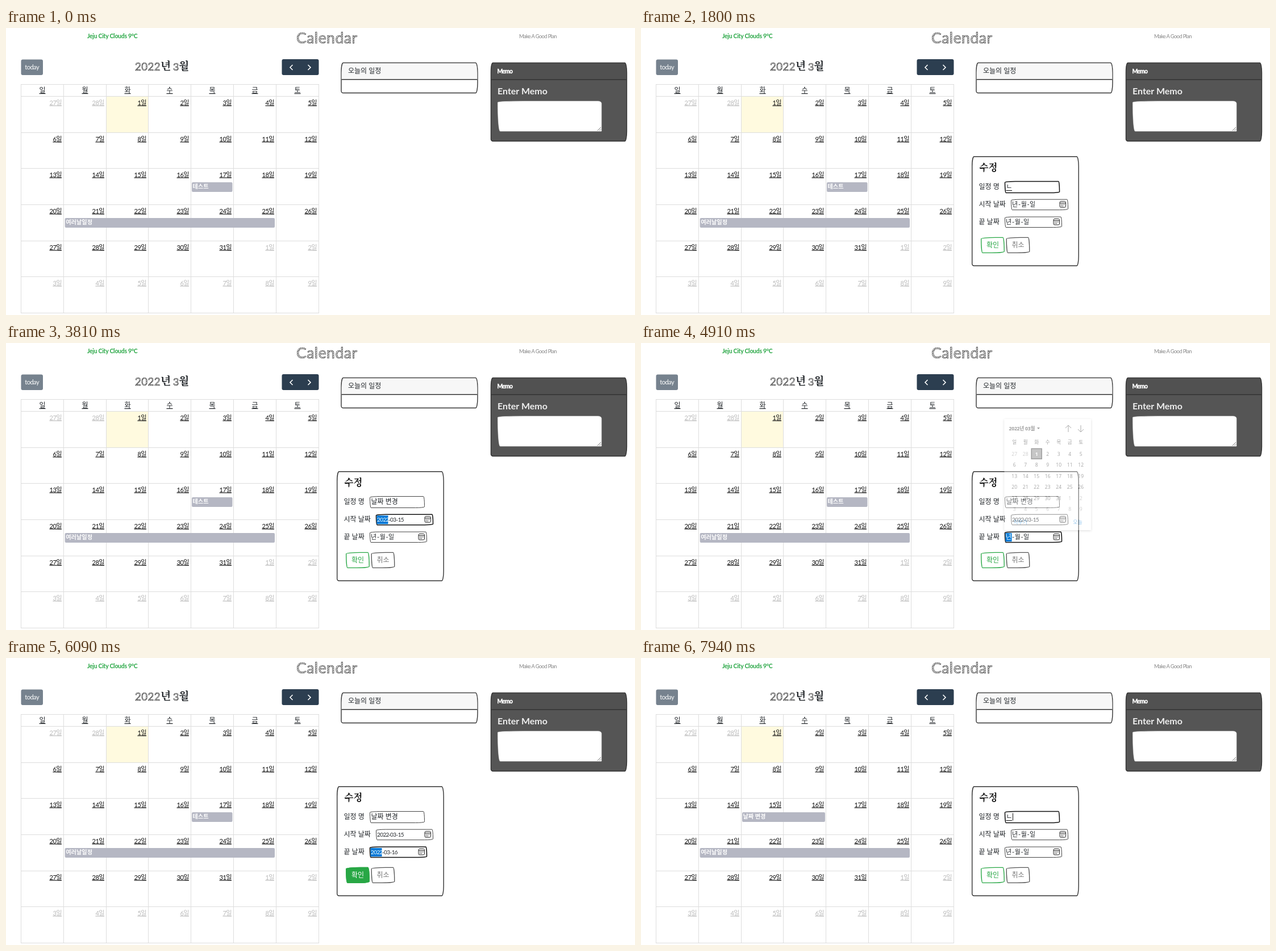
Recreate the animation shown at these times as an HTML page. Size 1107 px wide and 506 px high, loop 8 s.

```html
<!DOCTYPE html>
<html lang="ko">
<head>
<meta charset="utf-8">
<title>Calendar</title>
<style>
  html, body { margin: 0; width: 100%; height: 100%; overflow: hidden; background: #fff; }
  svg { display: block; width: 1107px; height: 506px; }
  text { font-family: Lato, "Noto Sans CJK KR", "Noto Sans CJK", sans-serif; white-space: pre; }
  .sketch { fill: url(#hatch); stroke: #333; stroke-width: .6; letter-spacing: .5px; }
  .tight { letter-spacing: -.6px; }
  .link { text-decoration: underline; }
  .mid { text-anchor: middle; }
  .end { text-anchor: end; }
  .bold { font-weight: 700; }
  .brush { font-family: "Noto Serif CJK KR", "Noto Sans CJK KR", "Noto Sans CJK", serif; font-weight: 600; }
  .pick text { font-family: "Open Sans", "Noto Sans CJK KR", "Noto Sans CJK", sans-serif; }
</style>
</head>
<body>
<svg viewBox="0 0 1107 506">
  <defs>
    <pattern id="hatch" width="2.5" height="2.5" patternUnits="userSpaceOnUse" patternTransform="rotate(40)">
      <rect width="2.5" height="2.5" fill="#fff"/><rect width="1" height="2.5" fill="#666"/>
    </pattern>
    <filter id="shadow" x="-10%" y="-10%" width="120%" height="120%">
      <feDropShadow dx="0" dy="1" stdDeviation="2" flood-opacity=".35"/>
    </filter>
  </defs>
  <g id="base"></g>
  <g id="live"></g>
</svg>
<script>
const WEEK = [...'일월화수목금토'];
const INK = '#212529', BLUE = '#0078d7', GREEN = '#28a745', GREY = '#555';

const text = (x, y, s, size, fill = INK, cls = '', more = '') =>
  `<text x="${x}" y="${y}" font-size="${size}" fill="${fill}" class="${cls}" ${more}>${s}</text>`;
const rect = (x, y, w, h, fill, more = '') =>
  `<rect x="${x}" y="${y}" width="${w}" height="${h}" fill="${fill}" ${more}/>`;
const path = (d, stroke, width = 1, fill = 'none') =>
  `<path d="${d}" fill="${fill}" stroke="${stroke}" stroke-width="${width}"/>`;

// Box with elliptical corners (tl, tr, br, bl), scaled down to fit like CSS border-radius
function boxPath(x, y, w, h, rx, ry) {
  const f = Math.min(1, w / (rx[0] + rx[1]), w / (rx[2] + rx[3]), h / (ry[0] + ry[3]), h / (ry[1] + ry[2]));
  const [a, b, c, d] = rx.map(v => v * f), [e, g, i, j] = ry.map(v => v * f);
  return `M${x + a} ${y}H${x + w - b}a${b} ${g} 0 0 1 ${b} ${g}V${y + h - i}a${c} ${i} 0 0 1 ${-c} ${i}` +
    `H${x + d}a${d} ${j} 0 0 1 ${-d} ${-j}V${y + e}a${a} ${e} 0 0 1 ${a} ${-e}z`;
}
const wobbly = (x, y, w, h) => boxPath(x, y, w, h, [255, 25, 225, 25], [25, 225, 25, 255]);
const card = (x, y, w, h, stroke, fill = '#fff') =>
  path(boxPath(x, y, w, h, [3.5, 3.5, 3.5, 3.5], [17, 17, 17, 3.5]), stroke, 1.4, fill);
const header = (x, y, w, h, stroke, fill) =>
  path(boxPath(x, y, w, h, [3.5, 3.5, 0, 0], [17, 17, 0, 0]), 'none', 0, fill) +
  path(`M${x} ${y + h}h${w}`, stroke, 1.4);

// Day shown in a month grid cell, March 2022 starting on a Tuesday
function dayAt(i) {
  const n = i - 1;
  return n < 1 ? [n + 28, true] : n > 31 ? [n - 31, true] : [n, false];
}

function calendar() {
  const X = i => Math.round(26.1 + 74.8 * i) + .5, Y = j => Math.round(119.9 + 63.7 * j) + .5;
  let s = rect(X(2), Y(0), X(3) - X(2), Y(1) - Y(0), '#fffadf');
  for (let i = 0; i < 8; i++) s += path(`M${X(i)} 99.5V${Y(6)}`, '#ddd');
  for (let j = -1; j < 7; j++) s += path(`M26 ${j < 0 ? 99.5 : Y(j)}H${X(7) + .5}`, '#ddd');
  WEEK.forEach((d, i) => s += text(X(i) + 37.5, 114, d, 12, INK, 'mid link'));
  for (let i = 0; i < 42; i++) {
    const [n, other] = dayAt(i);
    s += text(X(i % 7 + 1) - 3.5, Y(Math.floor(i / 7)) + 15, n + '일', 11.2, other ? '#bbb' : '#111', 'end link tight');
  }
  return s;
}

function base() {
  return text(143, 18, 'Jeju City Clouds 9°C', 10.5, GREEN, 'bold', 'letter-spacing="-.3"') +
    text(511, 27, 'Calendar', 26.5, '', 'sketch') +
    text(903, 18, 'Make A Good Plan', 9.5, '#888', '', 'letter-spacing="-.7"') +
    rect(26.5, 55.5, 38.5, 27.5, '#76828e', 'rx="3"') + text(45.7, 73, 'today', 11, '#fff', 'mid', 'letter-spacing="-.5"') +
    text(227, 75, '2022', 18.6, '', 'sketch') + text(272, 74, '년', 19, INK, 'brush') +
    text(294, 75, '3', 18, '', 'sketch') + text(304, 74, '월', 19, INK, 'brush') +
    rect(485.5, 55, 65, 28, '#2c3e50', 'rx="3"') +
    path('M504.5 65l-4.5 4.5l4.5 4.5M531.5 65l4.5 4.5l-4.5 4.5', '#fff', 1.6) +
    calendar() +
    card(590, 61.5, 240, 53, '#333') + header(590.7, 62.2, 238.6, 28.5, '#333', '#f7f7f7') +
    text(602, 80, '오늘의 일정', 12) +
    card(853.5, 61.5, 239, 138, '#333', GREY) + header(854.2, 62.2, 237.6, 28.8, '#333', '#515151') +
    text(864.5, 79.5, 'Memo', 10.5, '#fff', 'bold', 'letter-spacing="-.9" stroke="#fff" stroke-width=".4"') +
    text(865, 117, 'Enter Memo', 16, '#eee', 'bold') +
    path(boxPath(865.5, 129, 182.5, 53, [45, 6, 0, 4], [2, 4, 0, 48]), '#eee', .6, '#fff') +
    path('M1041 181l6 -6M1044.5 181l2.5 -2.5', '#666', .9);
}

const bar = (x, y, w, s) => rect(x, y, w, 17, '#b5b7c3', 'rx="2"') + text(x + 1.5, y + 11, s, 10.2, '#fff', 'bold');

// Outlined button; p is how far its hover fill has come
function button(x, y, s, color, p = 0, ink = color) {
  const d = wobbly(x + .7, y + .7, 40.5, 27), label = (c, o) => text(x + 21, y + 18, s, 12, c, 'mid', `opacity="${o}"`);
  return path(d, color, 1.3, '#fff') + `<g opacity="${p}">${path(d, color, 1.3, color)}</g>` +
    label(ink, 1 - p) + label('#fff', p);
}

const field = (x, y, w, h, focus) => path(wobbly(x + .5, y + .5, w - 1, h - 1), focus ? '#111' : '#444', focus ? 1.5 : 1, '#fff');

function dateField(x, y, value, focus) {
  let s = field(x, y, 101, 19.5, focus);
  const tx = x + 2, ty = y + 13;
  const [year, rest, cls, size, gap] = value
    ? ['2022', value.slice(4), 'tight', 10, 20] : ['년', '-월-일', '', 11, 11];
  if (focus) s += rect(tx - .5, y + 2.5, gap, 15, BLUE);
  s += text(tx, ty, year, size, focus ? '#fff' : INK, cls) +
    text(tx + gap, ty, rest, size, INK, cls, value ? '' : 'letter-spacing=".6"');
  const ix = x + 86, iy = y + 4;
  s += rect(ix, iy, 10.5, 10.5, 'none', 'rx="2" stroke="#222"') + path(`M${ix} ${iy + 3}h10.5`, '#222');
  for (let i = 0; i < 5; i++) s += rect(ix + 2 + i % 3 * 2.6, iy + 4.8 + Math.floor(i / 3) * 2.6, 1.3, 1.3, '#222');
  return s;
}

function infoCard(title, dates, hover) {
  const teal = '#17a2b8';
  return card(582.7, 226.7, 161.5, 112.3, teal) + header(583.4, 227.4, 160.1, 28.6, teal, '#f7f7f7') +
    text(595, 245, title, 12) + text(593.5, 279.5, dates, 10.3, '#111', 'bold', 'letter-spacing="-.75"') +
    button(598, 295.5, '수정', '#ffc107', hover) + button(642.5, 295.5, '삭제', '#dc3545') +
    button(687.5, 295.5, '취소', GREY);
}

function editCard(v) {
  let s = card(582.7, 226.7, 187.5, 192.6, '#333') + text(595.5, 252, '수정', 16.5, '#111', 'brush') +
    text(594.5, 284, '일정 명', 12) + text(594.5, 315, '시작 날짜', 12) + text(594.5, 346, '끝 날짜', 12) +
    field(640, 270, 97, 21, v.focus === 'name') + text(642.5, 284, v.name, 12);
  const width = [...v.name].reduce((sum, c) => sum + (c === ' ' ? 2.7 : 11.04), 0), end = 642.5 + width;
  if (v.focus === 'name') {
    if (v.name && !v.name.endsWith(' ')) s += rect(end - 11, 286, 10.5, 1, '#111');
    if (v.caret) s += rect(Math.round(end), 273.5, 1, 13, '#111');
  }
  return s + dateField(651, 301.7, v.from, v.focus === 'from') + dateField(640, 332.5, v.to, v.focus === 'to') +
    button(598, 368.7, '확인', GREEN, v.ok) + button(642.5, 368.7, '취소', GREY, 0, '#777');
}

function picker(x, y, opacity, hover, chosen) {
  let s = rect(0, 0, 152.5, 196, '#fff', 'filter="url(#shadow)"') +
    text(8, 19.5, '2022년 03월', 8.6, '#111', 'bold', 'letter-spacing="-.2"') +
    path('M57.5 15h5l-2.5 3z', 'none', 0, '#111') +
    path('M112.5 23v-12M107.5 16l5 -5l5 5M134.5 11v12M129.5 18l5 5l5 -5', '#333', 1);
  const X = i => 17.7 + 19.5 * i;
  WEEK.forEach((d, i) => s += text(X(i), 44, d, 8.6, '#222', 'mid'));
  for (let i = 0; i < 42; i++) {
    const [n, other] = dayAt(i), cx = X(i % 7), cy = 61.3 + 19.55 * Math.floor(i / 7), on = i === chosen + 1;
    if (on) s += rect(cx - 9, cy - 9, 18, 18, '#737373', 'stroke="#111" stroke-width="1.5"');
    else if (i === hover) s += rect(cx - 9.7, cy - 9.7, 19.5, 19.5, '#e3e3e3');
    s += text(cx, cy + 3.2, n, 8.5, on ? '#fff' : other ? '#888' : '#222', on ? 'mid bold' : 'mid');
  }
  s += text(16, 185, '지우기', 8.8, BLUE) + text(137, 185, '오늘', 8.8, BLUE, 'end');
  return `<g class="pick" transform="translate(${x} ${y})" opacity="${opacity}">${s}</g>`;
}

const clamp = v => Math.max(0, Math.min(1, v));
// Latest value whose start time has passed
const at = (t, first, ...steps) => steps.reduce((v, [time, next]) => t >= time ? next : v, first);
const TYPED = ['나', '날', '날ㅉ', '날짜', '날짜 ', '날짜 ㅂ', '날짜 벼', '날짜 변', '날짜 변ㄱ', '날짜 변겨', '날짜 변경'];

function scene(t) {
  const moved = t >= 6360;
  let s = moved ? bar(178, 272, 146, '날짜 변경') : bar(327, 272, 71.5, '테스트');
  s += bar(103.7, 335, 369.3, '여러날일정');
  const view = at(t, '', [370, 'info'], [840, 'edit'], [6360, ''], [7000, 'info'], [7550, 'edit']);
  if (view === 'info') {
    s += moved ? infoCard('여러날일정', '2022-3-21 ~ 2022-3-25', clamp((t - 7310) / 150))
      : infoCard('테스트', '2022-3-17 ~ 2022-3-17', clamp((t - 670) / 150));
  }
  if (view === 'edit') {
    s += editCard({
      focus: at(t, '', [1180, 'name'], [3120, 'from'], [4910, 'to'], [7550, ''], [7780, 'name']),
      name: t >= 7550 ? at(t, '', [7940, 'ㄴ']) : t < 1840 ? at(t, '', [1450, 'ㄴ'])
        : TYPED[Math.min(10, Math.floor((t - 1840) / 58))],
      caret: at(t, true, [1800, false], [1840, true], [2760, false], [7780, true]),
      from: at(t, '', [3730, '2022-03-15'], [7550, '']),
      to: at(t, '', [5730, '2022-03-16'], [7550, '']),
      ok: t < 7000 ? clamp((t - 5880) / 150) : 0
    });
  }
  const fromShown = at(t, 0, [3120, .4], [3160, .8], [3200, 1], [3770, .4], [3810, 0]);
  const toShown = at(t, 0, [4910, .4], [4965, .8], [5020, 1], [5790, .4], [5850, 0]);
  if (fromShown) s += picker(650.5, 324, fromShown, at(t, -1, [3410, 3], [3465, 10], [3520, 16]), t < 3730 ? 1 : 15);
  if (toShown) s += picker(639.5, 134, toShown,
    at(t, -1, [5220, 40], [5280, 33], [5345, 26], [5410, 19], [5470, 18], [5530, 17]), t < 5730 ? 1 : 16);
  return s;
}

document.getElementById('base').innerHTML = base();
const live = document.getElementById('live');
const start = performance.now();
let shown;
function draw() {
  const next = scene((performance.now() - start) % 8000);
  if (next !== shown) live.innerHTML = shown = next;
  requestAnimationFrame(draw);
}
draw();
</script>
</body>
</html>
```
